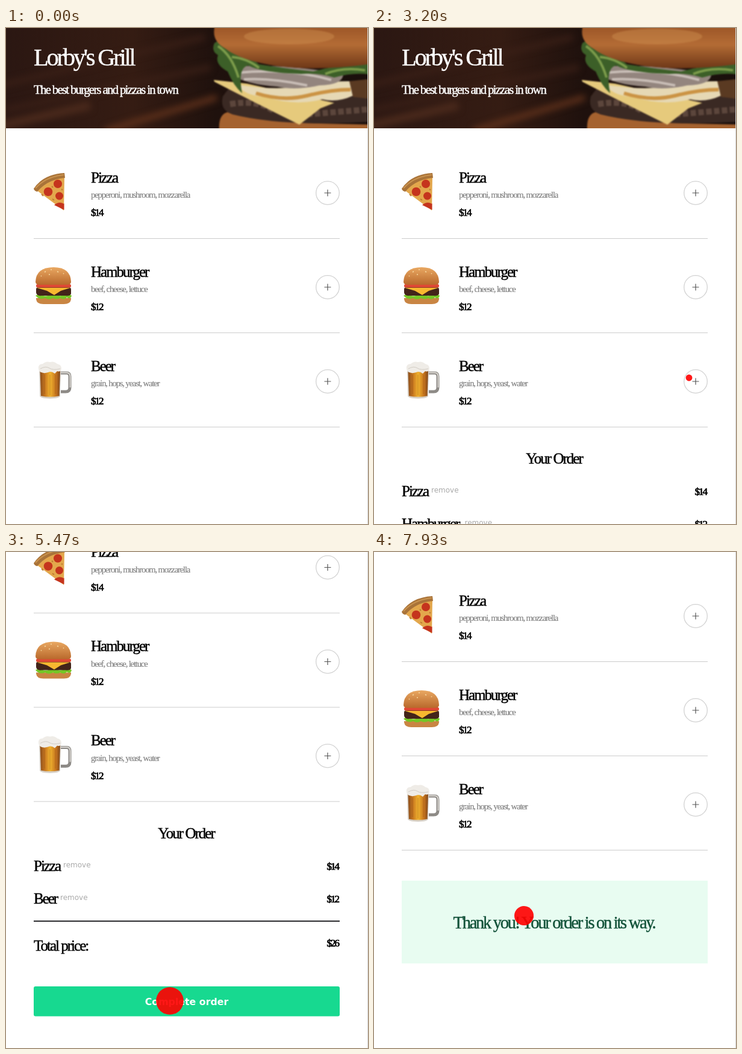
An HTML page that plays this animation: 601x821 px, repeating every 8000 ms.

```html
<!DOCTYPE html>
<html lang="en">
<head>
<meta charset="utf-8">
<title>Diner order</title>
<style>
  html, body { margin: 0; width: 100%; height: 100%; overflow: hidden; background: #fff; }
  svg { display: block; width: 601px; height: 821px; }
  text { fill: currentColor; font-family: 'DejaVu Sans', Verdana, sans-serif; }
  .serif { font-family: 'Liberation Serif', 'Times New Roman', serif; letter-spacing: -.08em;
           stroke: currentColor; stroke-width: .45px; }
  .name { font-size: 25px; }
  .info { font-size: 14.7px; color: #858585; stroke-width: .2px; }
  .price { font-size: 17px; letter-spacing: -.12em; stroke-width: .7px; }
  .remove { font-size: 12px; color: #aaa; }
  .button { font-size: 15.8px; font-weight: bold; color: #fff; }
  .hint { font-size: 20.1px; color: #666; }
  .mid { text-anchor: middle; }
  .end { text-anchor: end; }
  .green { fill: #17d990; }
  .dot { fill: #f00; fill-opacity: .91; }
</style>
</head>
<body>
<svg viewBox="0 0 601 821">
  <defs>
    <clipPath id="photo"><rect width="600" height="166"/></clipPath>
    <linearGradient id="wood"><stop stop-color="#2b1712"/><stop offset=".35" stop-color="#351c13"/><stop offset=".58" stop-color="#1f110d"/><stop offset="1" stop-color="#1a0f0c"/></linearGradient>
    <linearGradient id="crown" x2="0" y2="1"><stop stop-color="#9a5426"/><stop offset=".45" stop-color="#b46c35"/><stop offset="1" stop-color="#6e3717"/></linearGradient>
    <linearGradient id="bun" x2="0" y2="1"><stop stop-color="#e9a862"/><stop offset="1" stop-color="#b9692c"/></linearGradient>
    <linearGradient id="ale"><stop stop-color="#8a4d1c"/><stop offset=".25" stop-color="#c9781f"/><stop offset=".5" stop-color="#f0b22f"/><stop offset=".8" stop-color="#c4721d"/><stop offset="1" stop-color="#7d4519"/></linearGradient>

    <g id="pizza">
      <path d="M50 268Q68 250 97 246L96 302Z" fill="#e3a74c"/>
      <path d="M46 266Q62 242 97 240L98 248Q68 251 52 271Q47 270 46 266Z" fill="#a97339"/>
      <path d="M49 265Q66 246 96 243" fill="none" stroke="#c9934f" stroke-width="2"/>
      <g fill="#c5341d"><circle cx="70" cy="271" r="7.3"/><circle cx="86" cy="258" r="7"/><circle cx="88.5" cy="278" r="6.5"/><path d="M96.500 290V301L80 293Q88 286 96 291Z"/></g>
      <path d="M59 275l3 3M77 283l3 2M76 262l2 2M92 267l2 1" stroke="#bd7c31" stroke-width="2"/>
    </g>
    <g id="burger">
      <path d="M50 447H108V449Q107 457 96 457H62Q51 457 50 449Z" fill="#c98543"/>
      <path d="M49 443Q55 439 60 442T72 442T85 442T97 441T109 443Q107 450 101 446Q96 451 90 447Q84 450 78 447Q71 451 65 447Q56 451 49 443Z" fill="#75c626"/>
      <path d="M50 432Q50 429 55 429H104Q108 429 108 433V440Q106 444 99 443H59Q51 444 50 438Z" fill="#43241a"/>
      <path d="M51 430H107L91 435L80 442L68 435Z" fill="#f8b830"/>
      <rect x="50" y="424" width="58" height="5.500" rx="2.500" fill="#df4935"/>
      <path d="M49 420Q50 396 79 396Q107 396 108 420Q108 425 101 425H56Q49 425 49 420Z" fill="url(#bun)"/>
      <path d="M64 404l2-1M74 400l2 0M85 403l2 1M95 406l1 1M71 408l2 0M58 411l1-1" stroke="#f7d9a0" stroke-width="1.500"/>
    </g>
    <g id="beer">
      <path d="M91 571H101Q106 571 106 577V595Q106 602 99 602H91" fill="none" stroke="#8d8a86" stroke-width="5"/>
      <path d="M91 570.500H101Q106.500 571 106.500 577V595" fill="none" stroke="#d9d6d1" stroke-width="2"/>
      <path d="M55 562H91L90 609Q89 613 73 613.500Q57 613 56 609Z" fill="#d7d0c6"/>
      <path d="M56.500 566H90L88.500 609Q73 612 58 609Z" fill="url(#ale)"/>
      <path d="M64 574V606M73 574V608M82 574V606" stroke="#8d4f15" stroke-opacity=".4"/>
      <path d="M54 564Q53 556 61 556Q66 551 73 553Q80 551 85 556Q92 557 92 564Q91 570 85 568L81 572Q75 567 70 570Q61 573 55 568Z" fill="#efece7"/>
      <path d="M57 564Q66 559 72 563T90 564" fill="none" stroke="#d2ccc4"/>
    </g>
  </defs>

  <rect width="601" height="821" fill="#fff"/>
  <g id="page">
    <g clip-path="url(#photo)">
      <rect width="600" height="166" fill="url(#wood)"/>
      <g style="filter:blur(6px)" fill="none">
        <path d="M-10 95L330 15M0 135L340 65" stroke="#3b2017" stroke-width="8"/>
        <path d="M165 170L350 115" stroke="#63331c" stroke-width="9"/>
        <path d="M-10 162L140 128" stroke="#4b2a1c" stroke-width="14"/>
      </g>
      <g style="filter:blur(1.2px)">
        <path d="M354 170Q352 141 370 139Q430 156 520 158L610 160V170Z" fill="#a5622f"/>
        <path d="M360 113Q354 136 376 143Q460 164 610 155V100H370Z" fill="#3a2923"/>
        <path d="M372 126Q420 118 445 138M500 143T610 134" fill="none" stroke="#5c463c" stroke-width="10" stroke-dasharray="9 4"/>
        <path d="M345 86L400 92L545 124L522 133L487 160Q410 122 346 89Z" fill="#e6ca7c"/>
        <path d="M385 94Q450 104 490 96T574 88L576 112Q550 124 525 118Q480 130 430 114Q395 112 385 94Z" fill="#e6d8b4"/>
        <path d="M415 108Q460 122 500 112T572 102" fill="none" stroke="#cb9344" stroke-width="6"/>
        <path d="M570 88L610 84V118L576 114Z" fill="#5a3a22"/>
        <path d="M370 64Q460 58 560 76Q560 94 520 95Q480 104 450 97Q400 94 370 76Z" fill="#93857e"/>
        <path d="M385 74Q470 66 540 86M395 85Q440 82 500 95" fill="none" stroke="#cabfb8" stroke-width="4"/>
        <path d="M346 25Q360 15 375 32Q398 40 420 60Q470 68 510 72Q560 58 610 60V78Q580 72 545 82Q520 74 490 76Q425 74 402 62Q384 66 392 108Q378 96 368 72Q346 60 352 45Q340 38 346 25Z" fill="#3c5f28"/>
        <path d="M352 30Q375 45 386 82M375 48Q400 50 420 66M530 76Q560 64 596 70" fill="none" stroke="#7c9c4b" stroke-width="4"/>
        <path d="M346 0Q342 22 364 34Q390 54 450 63Q520 72 610 59V-5H346Z" fill="url(#crown)"/>
        <ellipse cx="470" cy="14" rx="75" ry="13" fill="#d19454" opacity=".4"/>
      </g>
      <g color="#fff">
        <text class="serif" x="46" y="62" font-size="40.500">Lorby's Grill</text>
        <text class="serif" x="46" y="109" font-size="20.700">The best burgers and pizzas in town</text>
      </g>
    </g>
    <g id="menu"></g>
    <g id="order">
      <text class="serif name mid" x="299" y="721">Your Order</text>
      <g id="lines"></g>
      <g id="sum">
        <path d="M46 750.500H554" stroke="#2b2b2f" stroke-width="2"/>
        <text class="serif name" x="46" y="799">Total price:</text>
        <text class="serif price end" x="552" y="792" id="total"></text>
        <rect class="green" x="46" y="858.500" width="508" height="49.500" rx="3"/>
        <text class="button mid" x="300" y="889.500">Complete order</text>
        <rect y="961" width="601" height="200" fill="#d7d7d7"/>
      </g>
    </g>
    <g id="thanks">
      <rect x="46" y="711" width="508" height="137" fill="#e8fcf1"/>
      <text class="serif mid" x="299" y="790" font-size="28.500" color="#13523a">Thank you! Your order is on its way.</text>
    </g>
  </g>
  <path d="M600.500 0V821" stroke="#d7d7d7"/>
  <g id="under"></g>
  <g id="modal">
    <rect width="601" height="821" fill="#000" fill-opacity=".5"/>
    <rect x="39" y="177" width="522" height="487" fill-opacity=".6" style="filter:blur(58px)"/>
    <rect x="39" y="167.500" width="522" height="487" rx="3" fill="#fff"/>
    <text class="mid" x="300" y="236" font-size="23.700" font-weight="bold">Enter card details</text>
    <g id="fields"></g>
    <rect class="green" x="62" y="569.500" width="476" height="60" rx="3"/>
    <text class="button mid" x="300" y="605.500">Pay</text>
  </g>
  <g id="over"></g>
</svg>
<script>
const $ = id => document.getElementById(id);
const clamp = x => Math.min(1, Math.max(0, x));
const smooth = x => x * x * (3 - 2 * x);
const show = (el, on) => { el.style.display = on ? '' : 'none'; };
const move = (el, y) => el.setAttribute('transform', `translate(0 ${y})`);
const add = (parent, html) => {
  parent.insertAdjacentHTML('beforeend', html);
  return parent.lastElementChild;
};

const LOOP = 8000, DOT_LIFE = 700, DOT_SIZE = 25, FADE = 300;
const CLICK = 90; // from press to its effect
const BOTTOM = 301.5, OVERSHOOT = 16;

const press = (start, x, y, layer = 'under') => ({
  start, done: start + CLICK, el: add($(layer), `<circle class="dot" cx="${x}" cy="${y}"/>`)
});
const orders = [press(1078, 535, 272.5), press(2010, 539, 429), press(2654, 523, 579)];
const remove = press(4414, 186, 521);
const complete = press(5410, 272, 743);
const focus = [press(6170, 266, 311, 'over'), press(6590, 260, 395, 'over'), press(7010, 255, 478, 'over')];
const pay = press(7680, 249, 602, 'over');
const presses = [...orders, remove, complete, ...focus, pay];

// hover: when the pointer enters and leaves the button
const items = [
  { id: 'pizza', name: 'Pizza', info: 'pepperoni, mushroom, mozzarella', price: 14, gap: 95, hover: [670, 1550] },
  { id: 'burger', name: 'Hamburger', info: 'beef, cheese, lettuce', price: 12, gap: 150.5, hover: [1700, 2110] },
  { id: 'beer', name: 'Beer', info: 'grain, hops, yeast, water', price: 12, gap: 90, hover: [2350, 2850] }
];
const PLUS = 'M528.5 273H539.5M534 267.500V278.500';

items.forEach((item, i) => {
  const row = add($('menu'), `<g>
    <text class="serif name" x="141" y="255.500">${item.name}</text>
    <text class="serif info" x="141" y="281">${item.info}</text>
    <text class="serif price" x="141" y="311">$${item.price}</text>
    <circle cx="534" cy="273" r="19.300" fill="#fff" stroke="#d2d2d2" stroke-width="1.300"/>
    <path d="${PLUS}" stroke="#555" stroke-width="1.200"/>
    <g class="glow"><circle cx="534" cy="273" r="18.300" fill="#303234"/><path d="${PLUS}" stroke="#fff" stroke-width="1.200"/></g>
    <path d="M46 348.500H554" stroke="#ccc"/></g>`);
  move(row, 156 * i);
  add($('menu'), `<use href="#${item.id}"/>`);
  item.glow = row.querySelector('.glow');
  item.line = add($('lines'), `<g>
    <text class="serif name" x="46" y="775">${item.name}</text>
    <text class="remove" x="${item.gap}" y="769">remove</text>
    <text class="serif price end" x="552" y="773">$${item.price}</text></g>`);
});

['Enter your name', 'Enter card number', 'Enter CVV'].forEach((hint, i) => {
  const y = 287 + 86 * i;
  add($('fields'), `<rect x="62.500" y="${y}" width="475" height="65" rx="3.500" fill="#fff" stroke="#777"/>`);
  add($('fields'), `<text class="hint" x="88" y="${y + 41}">${hint}</text>`);
});

// a flick to the end of the page that springs back; later the page gets shorter
function scrollAt(t) {
  if (t >= pay.done) return 167;
  if (t >= remove.done) return BOTTOM - 54;
  const run = smooth(clamp((t - 3240) / 310));
  const back = smooth(clamp((t - 3550) / 400));
  return (BOTTOM + OVERSHOOT) * run - OVERSHOOT * back;
}

function draw(t) {
  move($('page'), -scrollAt(t));
  let count = 0, total = 0;
  items.forEach(({ glow, line, hover: [enter, leave], id, price }, i) => {
    glow.style.opacity = clamp((t - enter) / FADE) * clamp(1 - (t - leave) / FADE);
    const ordered = t >= orders[i].done && !(id === 'burger' && t >= remove.done);
    show(line, ordered);
    if (!ordered) return;
    move(line, 54 * count++);
    total += price;
  });
  move($('sum'), 54 * count);
  $('total').textContent = '$' + total;
  show($('order'), count > 0 && t < pay.done);
  show($('thanks'), t >= pay.done);
  show($('modal'), t >= complete.done && t < pay.done);
  for (const { start, el } of presses) {
    const age = (t - start) / DOT_LIFE;
    el.setAttribute('r', age >= 0 && age < 1 ? DOT_SIZE * (1 - age) : 0);
  }
}

const begin = performance.now();
function tick() {
  draw((performance.now() - begin) % LOOP);
  requestAnimationFrame(tick);
}
tick();
</script>
</body>
</html>
```
